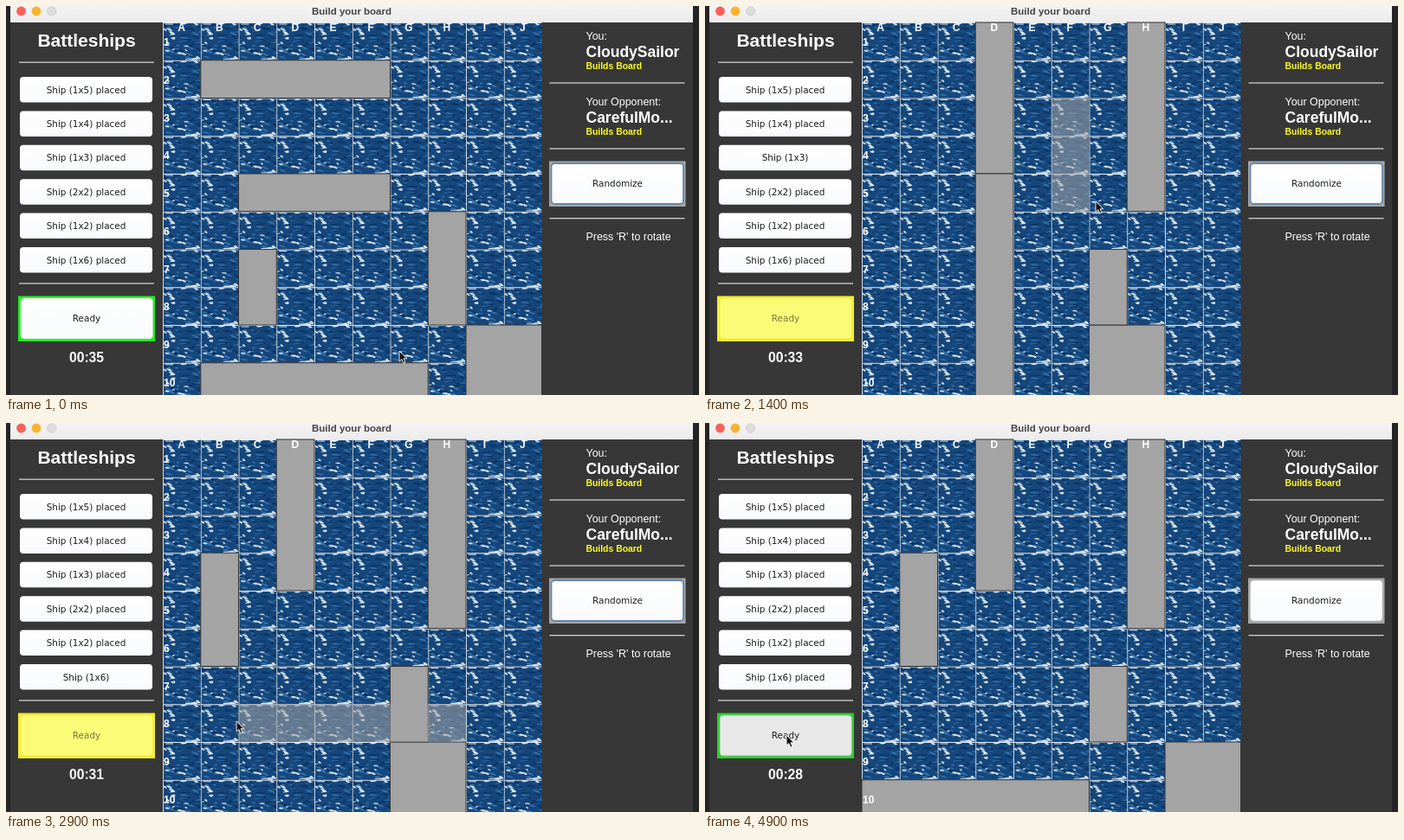
Recreate the animation shown at these times as an HTML page. Size 800x450 px, loop 5 s.

```html
<!DOCTYPE html>
<html lang="en">
<head>
<meta charset="utf-8">
<title>Build your board</title>
<style>
  html, body { margin: 0; width: 100%; height: 100%; overflow: hidden; background: #242424; }
  svg { display: block; width: 800px; height: 450px; }
  text { font-family: "Liberation Sans", Arial, sans-serif; fill: #fff; }
  .bold { font-weight: 700; }
  .ui { font-family: "DejaVu Sans", sans-serif; font-size: 10.45px; fill: #1c1c1c; text-anchor: middle; }
  .mid { text-anchor: middle; }
  .body { font-size: 12.45px; }
  .name { font-size: 17.5px; }
  .state { font-size: 10.4px; fill: #fdfb25; }
  .label { font-size: 12px; }
  .rule { fill: #cfcfcf; }
  .ship { fill: #a4a4a4; stroke: #333; stroke-width: 1; }
  .ghost { fill: #a4a4a4; opacity: .55; }
</style>
</head>
<body>
<svg id="stage" viewBox="0 0 800 450">
  <defs>
    <linearGradient id="face" x2="0" y2="1">
      <stop offset="0" stop-color="#fff"/><stop offset="1" stop-color="#f9fafc"/>
    </linearGradient>
    <linearGradient id="bar" x2="0" y2="1">
      <stop offset="0" stop-color="#f3f2f2"/><stop offset="1" stop-color="#ececec"/>
    </linearGradient>
    <clipPath id="edge"><rect width="43.75" height="43.75"/></clipPath>
    <g id="tile" clip-path="url(#edge)"></g>
  </defs>
  <rect width="800" height="450" fill="#242424"/>
  <rect x="5" y="18" width="788" height="432" fill="#373737"/>
  <path d="M5 0H793V19H5Z" fill="url(#bar)"/>
  <circle cx="17.5" cy="6" r="5.4" fill="#f9605a"/>
  <circle cx="35" cy="6" r="5.4" fill="#f8b32e"/>
  <circle cx="52.7" cy="6" r="5.2" fill="#dcdcdc" stroke="#c6c6c6" stroke-width=".6"/>
  <text class="bold mid" x="399" y="10" style="font-size:11.5px;fill:#444">Build your board</text>

  <g id="water"></g>
  <g id="fleet"></g>
  <rect id="ghost" class="ghost"/>
  <g id="labels"></g>

  <text class="bold mid" x="93" y="46.5" font-size="21">Battleships</text>
  <rect class="rule" x="15" y="64.5" width="156" height="1.3"/>
  <g id="list"></g>
  <rect class="rule" x="15" y="320.3" width="156" height="1.3"/>
  <rect id="frame" x="14" y="335.5" width="158" height="52.5"/>
  <rect id="ready" x="17" y="338" width="152.5" height="47" rx="4" stroke-width=".8"/>
  <text id="readyText" class="ui" x="93" y="365">Ready</text>
  <text id="clock" class="bold mid" x="93" y="411.7" font-size="15.7"></text>

  <text class="body" x="669.5" y="38.5">You:</text>
  <text class="bold name" x="669.5" y="59">CloudySailor</text>
  <text class="bold state" x="669.5" y="73">Builds Board</text>
  <rect class="rule" x="627.5" y="88.4" width="156" height="1.3"/>
  <text class="body" x="669.5" y="115">Your Opponent:</text>
  <text class="bold name" x="669.5" y="135">CarefulMo...</text>
  <text class="bold state" x="669.5" y="149">Builds Board</text>
  <rect class="rule" x="627.5" y="164.4" width="156" height="1.3"/>
  <rect x="627" y="179.5" width="157.5" height="52.5" fill="#a7a7a7"/>
  <rect id="random" x="629.5" y="182" width="152.5" height="47" rx="4"/>
  <text class="ui" x="706" y="209">Randomize</text>
  <rect class="rule" x="627.5" y="245" width="156" height="1.3"/>
  <text class="body" x="669.5" y="271.3">Press 'R' to rotate</text>

  <path id="cursor" d="M0 0V12.2L2.8 9.6L4.9 14.2L7 13.2L5 8.8H8.8Z" fill="#111" stroke="#fff" stroke-width=".9"/>
</svg>
<script>
const $ = id => document.getElementById(id);
const LOOP = 5000, STEP = 100;
const CELL = 43.75, LEFT = 181, TOP = 19;

function add(parent, tag, attrs, text) {
  const el = document.createElementNS("http://www.w3.org/2000/svg", tag);
  set(el, attrs);
  if (text) el.textContent = text;
  parent.appendChild(el);
  return el;
}
function set(el, attrs) {
  for (const k in attrs) el.setAttribute(k, attrs[k]);
}
const colX = c => LEFT + c * CELL;
const rowY = r => TOP + r * CELL;

// Water tile: short seeded ripples in three tones
let seed = 23;
function rnd() {
  seed = (seed * 16807) % 2147483647;
  return seed / 2147483647;
}
function ripples(count, len) {
  let d = "";
  for (let i = 0; i < count; i++) {
    const l = len * (.5 + rnd()), x = rnd() * CELL - 2, y = rnd() * CELL;
    const slope = (rnd() - .35) * l * .8, thick = .7 + rnd() * 1.1;
    d += `M${x.toFixed(1)} ${y.toFixed(1)}q${(l / 2).toFixed(1)} ${(-thick).toFixed(1)} ${l.toFixed(1)} ${slope.toFixed(1)}`
       + `q${(-l / 2).toFixed(1)} ${thick.toFixed(1)} ${(-l).toFixed(1)} ${(-slope).toFixed(1)}z`;
  }
  return d;
}
const tile = $("tile");
add(tile, "rect", { width: CELL, height: CELL, fill: "#15477c" });
add(tile, "path", { d: ripples(26, 9), fill: "#0d3768", stroke: "#0d3768", "stroke-width": .8 });
add(tile, "path", { d: ripples(26, 7), fill: "#3470a8", stroke: "#3470a8", "stroke-width": .4 });
add(tile, "path", { d: ripples(19, 5), fill: "#e4eef8", stroke: "#e4eef8", "stroke-width": .35 });
add(tile, "path", { d: "M0 .4H43.75M3 2H12M26 42.8H40", stroke: "#dfeaf5", "stroke-width": 1.2 });
add(tile, "path", { d: "M.4 0V43.75", stroke: "#d5e0ea", "stroke-width": 1.1 });

for (let r = 0; r < 10; r++) {
  for (let c = 0; c < 10; c++) add($("water"), "use", { href: "#tile", x: colX(c), y: rowY(r) });
  add($("labels"), "text", { class: "bold label mid", x: colX(r) + 21.5, y: 29.3 }, "ABCDEFGHIJ"[r]);
  add($("labels"), "text", { class: "bold label", x: 182, y: rowY(r) + 27 }, String(r + 1));
}

// Ships as [column, row, width, height]
const sizes = ["1x5", "1x4", "1x3", "2x2", "1x2", "1x6"];
const before = [[1, 1, 5, 1], [2, 4, 4, 1], [7, 5, 1, 3], [8, 8, 2, 2], [2, 6, 1, 2], [1, 9, 6, 1]];
const after = [[7, 0, 1, 5], [3, 0, 1, 4], [1, 3, 1, 3], [6, 8, 2, 2], [6, 6, 1, 2], [3, 4, 1, 6]];
const SHUFFLE = 600;
const drags = [
  { ship: 2, from: 1200, to: 2000, end: [1, 3, 1, 3] },
  { ship: 5, from: 2500, to: 3300, end: [0, 9, 6, 1], turn: 2800 },
  { ship: 3, from: 3800, to: 4100, end: [8, 8, 2, 2] }
];
const path = [
  [0, 454, 399], [500, 655, 215], [800, 660, 217], [1100, 250, 262], [1200, 246, 262],
  [1400, 451, 226], [1500, 478, 215], [1900, 250, 258], [2000, 246, 262], [2400, 335, 228],
  [2500, 333, 226], [3200, 216, 434], [3500, 214, 436], [3800, 462, 432], [4100, 552, 432],
  [4400, 158, 380], [4700, 95, 362], [4900, 94, 361]
];

const fleet = sizes.map(() => add($("fleet"), "rect", { class: "ship" }));
const captions = sizes.map((s, i) => {
  const y = 82 + i * 39.4;
  add($("list"), "rect", { x: 16, y, width: 153, height: 29.5, rx: 4, fill: "url(#face)" });
  return add($("list"), "text", { class: "ui", x: 92.5, y: y + 18.5 });
});

function pointer(t) {
  const i = path.findIndex(p => p[0] > t);
  if (i < 0) return path[path.length - 1].slice(1);
  const [t0, x0, y0] = path[i - 1], [t1, x1, y1] = path[i];
  const k = (t - t0) / (t1 - t0);
  return [x0 + (x1 - x0) * k, y0 + (y1 - y0) * k];
}
function place(el, [c, r, w, h]) {
  set(el, { x: colX(c), y: rowY(r), width: w * CELL, height: h * CELL });
}
const clamp = (v, max) => Math.max(0, Math.min(max, v));

function draw(t) {
  const ships = (t < SHUFFLE ? before : after).slice();
  let held = null;
  for (const d of drags) {
    if (t >= d.to) ships[d.ship] = d.end;
    else if (t >= d.from) held = d;
  }
  ships.forEach((s, i) => {
    const lifted = held && held.ship === i;
    place(fleet[i], s);
    fleet[i].style.display = lifted ? "none" : "";
    captions[i].textContent = `Ship (${sizes[i]})` + (lifted ? "" : " placed");
  });

  $("ghost").style.display = held ? "" : "none";
  if (held) {
    // The held ship trails the pointer slightly
    const [px, py] = pointer(t - 30);
    let [, , w, h] = after[held.ship];
    if (held.turn && t >= held.turn) [w, h] = [h, w];
    const c = clamp(Math.floor((px - LEFT) / CELL), 10 - w);
    const r = clamp(Math.floor((py - TOP) / CELL) - h + 1, 10 - h);
    place($("ghost"), [c, r, w, h]);
  }

  const pressed = t >= 4900, shuffling = t === SHUFFLE;
  $("frame").setAttribute("fill", held ? "#f5ef2b" : pressed ? "#22d61f" : "#20ee1e");
  set($("ready"), {
    fill: held ? "#fbfb78" : pressed ? "#e8e8e8" : "url(#face)",
    stroke: held ? "#efea4a" : pressed ? "#9aa9b8" : "#b9d9b9"
  });
  $("readyText").style.fill = held ? "#77773c" : "#1c1c1c";
  set($("random"), {
    fill: shuffling ? "#e8e8e8" : "url(#face)",
    stroke: pressed ? "#c4c4c4" : "#6687ab",
    "stroke-width": pressed ? .6 : 1.8
  });
  $("clock").textContent = "00:" + Math.floor(35.02 - 1.35 * t / 1000);
  const [x, y] = pointer(t);
  $("cursor").setAttribute("transform", `translate(${x.toFixed(1)} ${y.toFixed(1)})`);
}

const start = performance.now();
function tick() {
  const t = (performance.now() - start) % LOOP;
  draw(Math.floor(t / STEP) * STEP);
  requestAnimationFrame(tick);
}
tick();
</script>
</body>
</html>
```
